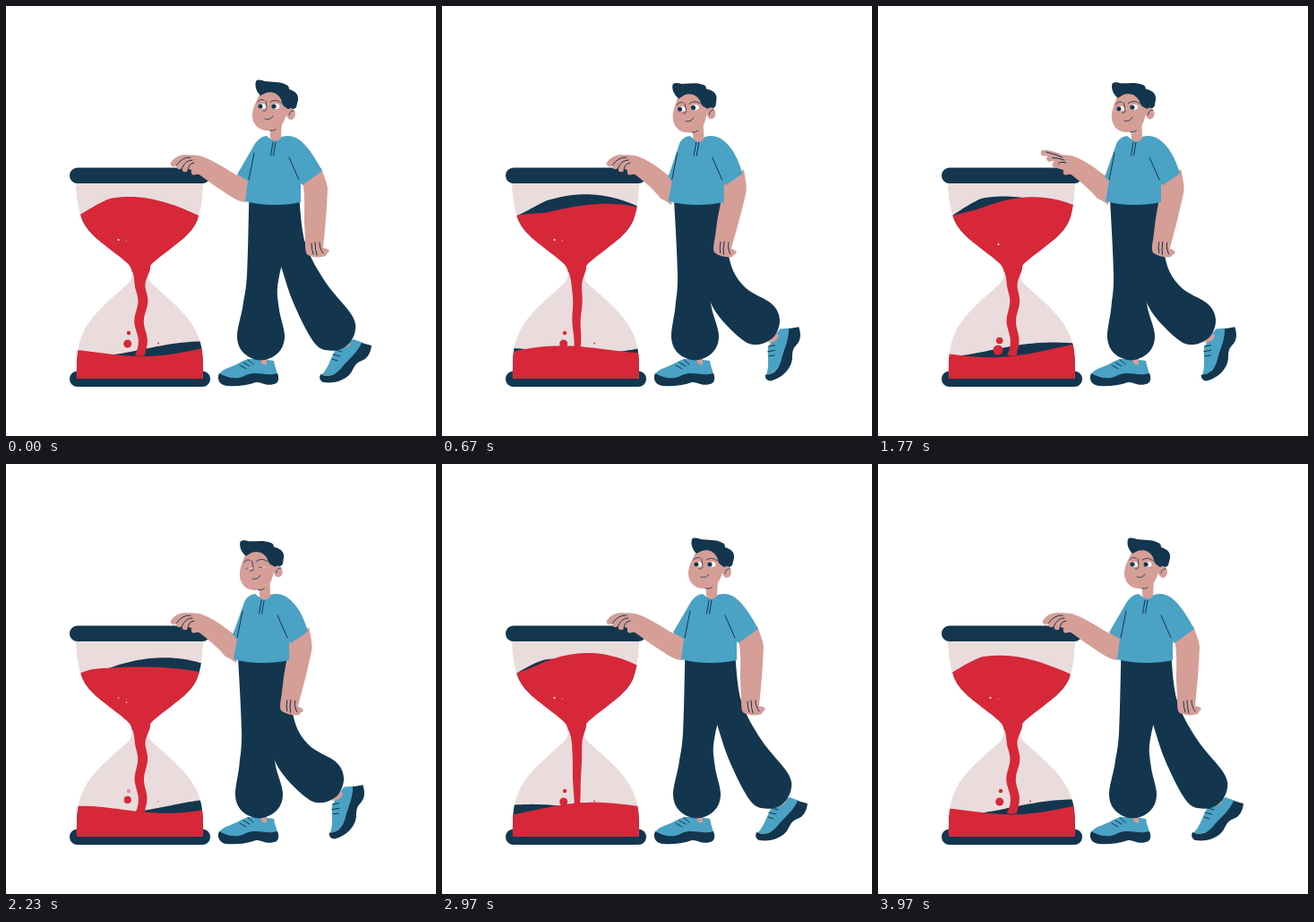
Animation, 480 px wide and 480 px high, one loop 4000 ms. Source, as an HTML page:

```html
<!DOCTYPE html>
<html lang="en">
<head>
<meta charset="utf-8">
<title>Waiting by the hourglass</title>
<style>
  html, body { margin: 0; width: 100%; height: 100%; overflow: hidden; background: #fff; }
  svg { display: block; width: 100%; height: 100%; }
  .navy { fill: #13364e; }
  .red { fill: #d62839; }
  .blue { fill: #4aa2c4; }
  .skin { fill: #d59e97; }
  .white { fill: #fff; }
  .line { fill: none; stroke: #13364e; stroke-linecap: round; }
  .finger { fill: none; stroke: #d59e97; stroke-width: 6.5; stroke-linecap: round; }
</style>
</head>
<body>
<svg viewBox="0 0 480 480">
  <defs>
    <clipPath id="glass">
      <path id="bulb" d="M78 198 C79 220 82 238 92 250 C104 265 130 280 138 290 C142 296 142 303 137 309 C126 320 96 342 86 365 C79 380 79 392 79 416 H220 C220 392 220 380 213 365 C203 342 173 320 162 309 C157 303 157 296 161 290 C169 280 195 265 207 250 C217 238 219 220 220 198 Z"/>
    </clipPath>
  </defs>

  <g id="backFoot">
    <path class="blue" d="M352 412 C360 404 362 394 367 385 L380 376 L388 372 L399 376 C393 386 384 394 376 404 C368 412 360 414 352 412 Z"/>
    <path class="skin" d="M369 380 L382 374 L384 378 C379 383 374 382 369 380 Z"/>
    <path class="navy" d="M351 411 C362 416 370 410 376 402 C384 393 392 387 397 376 L408 379 C407 388 403 394 397 396 C391 398 389 402 386 408 C380 418 366 422 354 420 C349 417 350 414 351 411 Z"/>
    <path class="line" d="M368 384 L375 386 M365 389 L373 391 M364 394 L370 396"/>
  </g>
  <g id="frontFoot">
    <path class="blue" d="M238 411 C242 404 254 403 263 397 L270 394 H284 L299 396 C300 403 303 408 303 413 L285 417 L250 419 Z"/>
    <path class="skin" d="M283 392 H291 V400 C287 402 284 398 283 392 Z"/>
    <path class="navy" d="M238 410 C246 415 258 418 268 412 C280 407 290 414 303 410 C306 417 303 422 299 422 C290 425 285 419 279 420 C268 424 256 425 246 424 C238 423 235 416 238 410 Z"/>
    <path class="line" d="M270 395 L276 400 M265 398 L272 402 M261 401 L268 405"/>
  </g>
  <path id="backLeg" class="navy"/>
  <path id="frontLeg" class="navy"/>
  <g id="restArm">
    <path class="skin" d="M331 196 C334 212 333 225 333 240 L334 262 C334 270 334 276 337 278 C343 281 352 281 357 279 C358 277 358 276 360 275 C362 272 359 271 354 270 C356 250 358 230 359 204 C358 196 355 190 352 181 Z"/>
    <path class="line" d="M341 265 Q341 272 343 277 M345 264 Q345 272 347 278 M350 264 Q350 271 354 276"/>
  </g>

  <g id="hourglass">
    <rect class="navy" x="71" y="180.5" width="157" height="17.5" rx="8.7"/>
    <rect class="navy" x="71" y="407.5" width="157" height="17.5" rx="8.7"/>
    <use href="#bulb" fill="#eadcdc"/>
    <g clip-path="url(#glass)">
      <path id="topBack" class="navy"/>
      <path id="topFront" class="red"/>
      <path id="lowBack" class="navy"/>
      <path id="lowFront" class="red"/>
    </g>
    <path id="stream" class="red"/>
    <circle id="dropBig" class="red" cx="135.7"/>
    <circle id="dropLow" class="red" cx="134" cy="384" r="5.5"/>
    <g id="spray">
      <circle class="red" cx="137" cy="365" r="2.2"/>
      <circle class="red" cx="170" cy="376.5" r=".9"/>
      <circle class="white" cx="125.5" cy="261" r="1"/>
      <circle class="white" cx="134.5" cy="262" r=".5"/>
    </g>
    <circle id="bubble" class="white" cx="134.5" cy="266" r=".9"/>
  </g>

  <path id="leanArm" class="skin"/>
  <path class="skin" d="M219 168 C211 166 205 165 199 169 L200 181 L207 183 C206 187 208 190 212 188 L218 188 Z"/>
  <path id="fingers" class="finger"/>
  <path id="creases" class="line"/>
  <g id="torso">
    <path id="shirt" class="blue"/>
    <path class="line" d="M298 152 L295.500 167 M301 152 L298.500 167 M277 164 L271 194 M316 169 L327 194"/>
  </g>

  <g id="head">
    <path class="skin" d="M295 134 L308 128 L307 147 C303 152 299 152 295 147 Z"/>
    <path class="skin" d="M284 97 C281 104 275 113 275 122 C275 132 282 139 292 139 C301 139 308 135 311 127 L317 110 L308 94 Z"/>
    <path class="navy" d="M279 84 C281 81 286 83 289 84 C297 85 306 84 313 88 C316 89 316 92 316 93 C323 95 327 99 326 105 L324 113 C320 117 315 116 312 113 C308 111 308 107 307 104 C303 97 297 95 290 97 L284 100 C281 97 277 91 279 84 Z"/>
    <ellipse class="skin" cx="318" cy="120.500" rx="5" ry="6.500"/>
    <g id="eyes">
      <ellipse class="white" cx="286" cy="0" rx="4" ry="2.800"/>
      <ellipse class="white" cx="301" cy="0" rx="4.500" ry="3"/>
      <circle class="navy" cx="284" cy="0" r="2.500"/>
      <circle class="navy" cx="299" cy="0" r="2.600"/>
    </g>
    <path class="line" stroke-width=".8" d="M281 107 Q284 103 288 105 M295 107 Q301 103 307 108 M290 106 L291 113 M287 117 Q290 118 291 115 M289 126 Q295 128 298 123 M316 122 C316 119 318 117 321 117 M294 139 Q298 140 301 138"/>
  </g>
</svg>

<script>
const LOOP = 4000, TURN = 2 * Math.PI;
const set = (id, name, value) => document.getElementById(id).setAttribute(name, value);

const clamp = u => Math.min(1, Math.max(0, u));
const smooth = u => u * u * (3 - 2 * u);
const ease = (t, from, to) => smooth(clamp((t - from) / (to - from)));
// Rises from a to b, falls from c to d.
const span = (t, a, b, c, d) => ease(t, a, b) - ease(t, c, d);

// Smooth open line through points.
function curve(pts) {
  let d = 'M' + pts[0];
  for (let i = 0; i < pts.length - 1; i++) {
    const a = pts[i], b = pts[i + 1];
    const p = pts[i - 1] || a, q = pts[i + 2] || b;
    const c1 = a.map((v, k) => v + (b[k] - p[k]) / 6);
    const c2 = b.map((v, k) => v - (q[k] - a[k]) / 6);
    d += `C${c1} ${c2} ${b}`;
  }
  return d;
}

// Trouser leg around a spine of [x, y, shift x, shift y, half width].
const frontSpine = [[299, 219, -12, 0, 28], [287, 300, -6, 0, 18], [284.5, 335, -4, 0, 20], [284.5, 369, -2, 0, 26.5]];
const backSpine = [[304, 219, -12, 0, 24], [318, 270, -14, 15, 17], [338, 318, -18, 7, 21], [364, 359, -13, -7, 26]];

function drawLeg(id, spine, lean) {
  const at = spine.map(([x, y, dx, dy, w]) => ({ x: x + dx * lean, y: y + dy * lean, w }));
  const last = at.length - 1;
  const edge = (i, turn) => {
    const a = at[Math.max(0, i - 1)], b = at[Math.min(last, i + 1)], c = at[i];
    const angle = Math.atan2(b.y - a.y, b.x - a.x) + turn * TURN / 4;
    return [c.x + c.w * Math.cos(angle), c.y + c.w * Math.sin(angle)];
  };
  const pts = [];
  for (let i = 0; i < last; i++) pts.push(edge(i, -1));
  for (let turn = -1; turn <= 1; turn += .5) pts.push(edge(last, turn));
  for (let i = last - 1; i >= 0; i--) pts.push(edge(i, 1));
  set(id, 'd', curve(pts) + 'Z');
}

function drawLegs(lean) {
  drawLeg('frontLeg', frontSpine, lean);
  drawLeg('backLeg', backSpine, lean);
  set('backFoot', 'transform', `translate(${-8.4 * lean} ${-7 * lean}) rotate(${-25.5 * lean} 377 375)`);
}

function drawTorso(p) {
  set('torso', 'transform', `translate(${-13 * p} 0)`);
  set('shirt', 'd', `M291 145 C284 146 280 150 ${276 + 2 * p} 157 L${258 + 8 * p} ${188 + 3 * p}
    L${270 + p} 195 L267 218 C285 223 311 223 329 219 L329 198 L331 200 L${353 - 3 * p} ${184 + 3 * p}
    C345 170 338 157 327 149 C321 145 315 144 308 146 C303 151 297 151 291 145 Z`);
  set('restArm', 'transform', `translate(${-15 * p} 0) rotate(${9.5 * p} 343 190)`);
  set('leanArm', 'd', `M215 167 C225 169 236 176 ${258 - 5 * p} 189 L${264 - 6 * p} 184 L${273 - 11 * p} 195
    L${268 - 11 * p} ${219 + 3 * p} C${262 - 9 * p} 219 ${256 - 8 * p} 216 ${250 - 5 * p} ${212 + 3 * p}
    C${238 - 2 * p} 204 226 196 214 187 Z`);
}

function drawHand(lift) {
  let skin = '', lines = '';
  for (let i = 0; i < 3; i++) {
    const tipX = 187 + 6.5 * i - 2 * lift, tipY = 176 + 3 * i - (12 - 3.5 * i) * lift;
    const bendX = 194 + 3 * i, bendY = 167 + 4 * i - 3 * lift;
    const rootX = 206 + 2 * i, rootY = 170 + 3 * i;
    skin += `M${rootX} ${rootY} Q${bendX} ${bendY} ${tipX} ${tipY}`;
    lines += `M${rootX} ${rootY - 1} Q${bendX + 3} ${bendY + 1} ${tipX + 3} ${tipY + 2 - 3 * lift}`;
  }
  set('fingers', 'd', skin);
  set('creases', 'd', lines);
}

function drawHead(t, p) {
  set('head', 'transform', `translate(${-12 * p} ${p}) rotate(${-5.5 * p} 300 145)`);
  const blinkAt = 1120 * Math.max(1, Math.round(t / 1120));
  const open = Math.max(.12, ease(Math.abs(t - blinkAt), 10, 110));
  set('eyes', 'transform', `translate(0 ${114.5 - 2.5 * open}) scale(1 ${open})`);
}

// Travelling waves: crest and trough run to the right over a resting level.
const bowl = x => (x - 155) ** 2 / 350;
const slope = x => -.045 * (x - 80);
const shore = x => clamp((x - 80) / 35);
const waves = {
  topBack:  { floor: 260, turns: 3, phase: .79, length: 440, level: x => 220 + bowl(x), size: x => 10 * shore(x) },
  topFront: { floor: 297, turns: 3, phase: .41, length: 300, level: x => 218.5 + bowl(x), size: x => 8 * shore(x) },
  lowBack:  { floor: 410, turns: 2, phase: .95, length: 240, level: x => 386.5 + slope(x), size: () => 6 },
  lowFront: { floor: 417, turns: 2, phase: .65, length: 235, level: x => 388 + slope(x), size: () => 6.5 }
};

function drawWave(id, t) {
  const { floor, turns, phase, length, level, size } = waves[id];
  let d = `M76 ${floor}`;
  for (let x = 76; x <= 224; x += 4) {
    const u = t / LOOP * turns - phase - (x - 80) / length;
    d += `L${x} ${level(x) + size(x) * Math.cos(TURN * u)}`;
  }
  set(id, 'd', d + `V${floor}Z`);
}

function drawStream(t) {
  const sway = .55 + .45 * Math.cos(TURN * t * 2 / LOOP);
  const left = [], right = [];
  for (let y = 290; y <= 390; y += 5) {
    const x = 150.7 + 2.2 * sway * clamp((y - 295) / 25) * Math.sin(TURN * (y - 318) / 45);
    const fall = (y - 290) / 100;
    const w = 5.6 + 5 * Math.exp(-((fall * 8) ** 2)) - (.8 + 2.5 * (1 - sway)) * fall ** 2;
    left.push([x - w, y]);
    right.unshift([x + w, y]);
  }
  set('stream', 'd', curve([...left, ...right]) + 'Z');
}

function drawDrops(t) {
  const calm = span(t, 800, 1000, 2100, 2400);
  set('spray', 'opacity', 1 - calm);
  set('bubble', 'opacity', calm);
  set('dropBig', 'r', 4.5 - .7 * calm);
  set('dropBig', 'cy', 377 - 3.5 * calm);
  set('dropLow', 'opacity', span(t, 1450, 1650, 1900, 2100));
}

function draw(now) {
  const t = now % LOOP;
  const lean = span(t, 60, 560, 2200, 2940);
  const swing = span(t, 200, 620, 720, 1040);
  drawLegs(lean);
  drawTorso(lean + .1 * swing);
  drawHead(t, lean + .22 * swing);
  drawHand(span(t % 800, 40, 160, 300, 460));
  for (const id in waves) drawWave(id, t);
  drawStream(t);
  drawDrops(t);
}

const start = performance.now();
function tick() {
  draw(performance.now() - start);
  requestAnimationFrame(tick);
}
tick();
</script>
</body>
</html>
```
